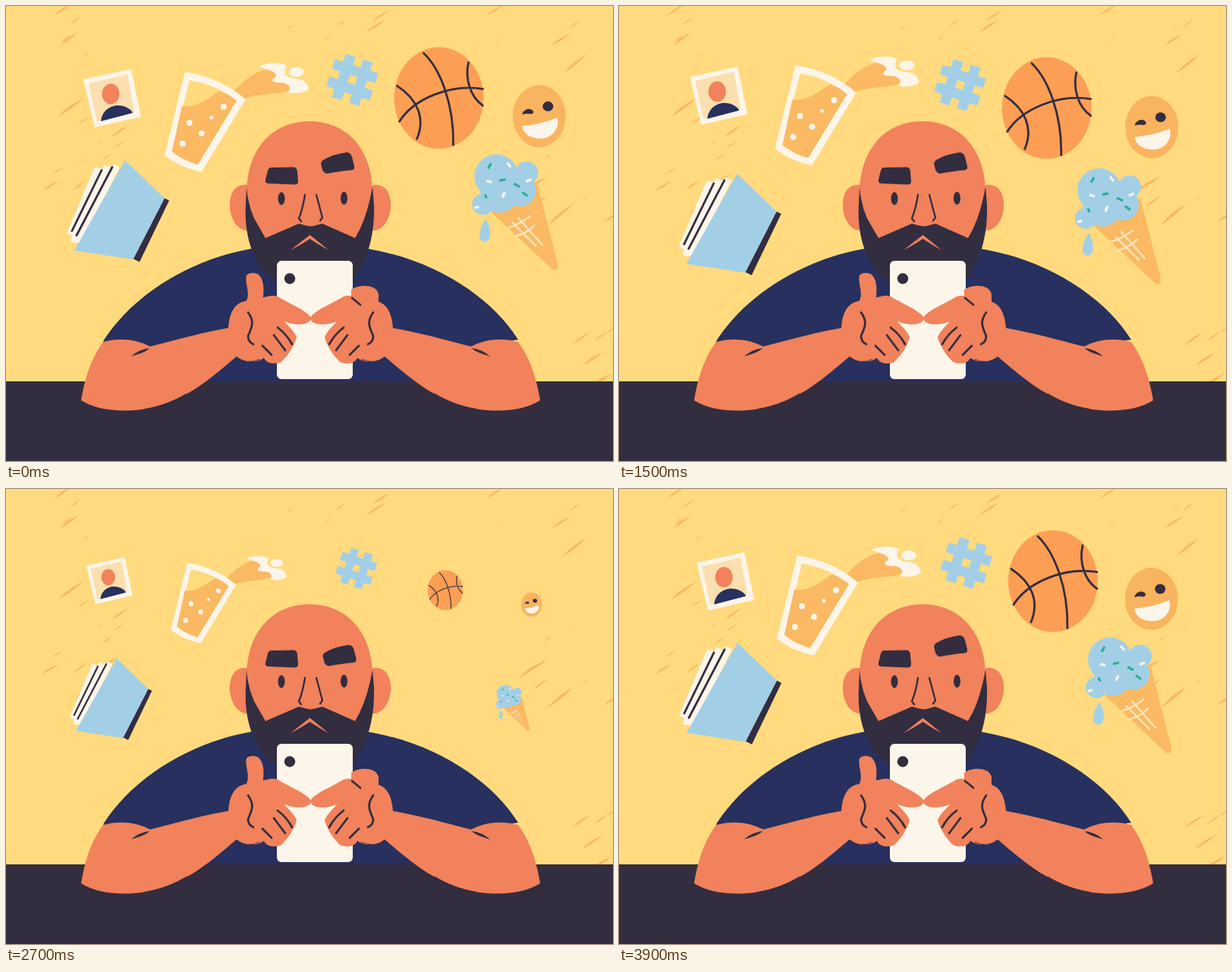
Recreate the animation shown at these times as an HTML page. Size 800x600 px, loop 4 s.

```html
<!DOCTYPE html>
<html lang="en">
<head>
<meta charset="utf-8">
<title>Scrolling</title>
<style>
  html, body { margin: 0; width: 100%; height: 100%; overflow: hidden; background: #ffda7e; }
  svg { position: absolute; inset: 0; width: 100%; height: 100%; display: block; }
  .skin { fill: #f1825b; }
  .dark { fill: #332d40; }
  .navy { fill: #27305e; }
  .white { fill: #fcf5e9; }
  .blue { fill: #a3cfe6; }
  .amber { fill: #fab962; }
  .line { fill: none; stroke: #332d40; stroke-width: 2.8; stroke-linecap: round; stroke-linejoin: round; }
  .fine { stroke-width: 2.3; }
  .thin { stroke-width: 0.9; }
</style>
</head>
<body>
<svg viewBox="0 0 800 600">
  <defs>
    <g id="arm">
      <path class="skin" d="M128 443C148 437 172 439 190 449C225 440 260 430 296 424L320 470L304 462C270 491 237 521 185 531C148 537 118 532 99 520C104 490 112 465 128 443Z"/>
      <path class="line thin" d="M183 531.500C205 528 222 521 238 511"/>
      <path class="dark" d="M165 462Q175 453 189 451Q186 456 165 462Z"/>
    </g>
    <g id="hand">
      <path class="skin" d="M293 426C294 408 299 392 316 389L345 383Q352 381 358 383C372 392 396 401 402 411C402 420 386 423 367 416C374 424 381 430 383 437C380 449 370 463 362 470C352 473 343 471 340 464C330 472 313 470 304 462Z"/>
      <path class="line" d="M319 404C328 416 324 424 319 435Q319 443 326 446M358 424Q370 433 377 446M353 434L368 454M338 448L350 460"/>
      <path class="line thin" d="M303 464Q318 473 334 466"/>
    </g>
    <path id="ear" class="skin" d="M319 236C300 233 294 250 295 266C297 285 307 298 323 296Z"/>
  </defs>

  <rect width="800" height="600" fill="#ffda7e"/>
  <g id="streaks" fill="#f8b75e"></g>

  <g id="photo">
    <path class="white" d="M102 97L165 83L178 146L117 160Z"/>
    <path fill="#fbdfae" d="M109 102L160 90L169 140L120 152Z"/>
    <ellipse class="skin" cx="138" cy="116" rx="11.5" ry="13.5"/>
    <path class="navy" d="M125 152C126 139 136 132 146 131C157 131 165 136 167 141Z"/>
  </g>

  <g id="book">
    <path class="white" d="M118 212L128 214L130 209L138 212L143 208L151 212L100 312L86 311L88 303L81 299Z"/>
    <path class="line" d="M127 216L88 296M141 212L94 302"/>
    <path class="blue" d="M158 203L212 255L171 334L91 322Z"/>
    <path class="dark" d="M210 253L216 256L177 337L169 333Z"/>
  </g>

  <g id="beer">
    <path class="amber" d="M300 114C316 97 335 79 361 84L380 108C366 118 340 113 312 123Z"/>
    <path class="white" d="M335 80C345 74 364 74 371 79C365 90 371 95 385 96C395 97 400 104 400 110C395 115 379 116 373 114C379 106 372 101 362 101C352 101 349 98 357 93C358 86 345 84 335 80Z"/>
    <ellipse class="white" cx="384" cy="87" rx="10" ry="6.5"/>
    <path class="white" d="M237 87Q284 94 317 123L259 219Q230 213 210 197Z"/>
    <path fill="#ffda7e" d="M243 98Q278 103 305 125L254 209Q235 204 220 192Z"/>
    <path class="amber" d="M233 132C252 135 268 122 283 112Q296 117 305 125L254 209Q235 204 220 192Z"/>
    <g class="white">
      <circle cx="288" cy="133" r="4"/><circle cx="272" cy="147" r="2.5"/><circle cx="243" cy="154" r="4"/>
      <circle cx="259" cy="168" r="4"/><circle cx="234" cy="181.5" r="4"/>
    </g>
  </g>

  <g id="hash">
    <path transform="translate(456 97.5) rotate(18)" fill="none" stroke="#a3cfe6" stroke-width="13.5" d="M-12-30V30M12-30V30M-30-12H30M-30 12H30"/>
  </g>

  <g id="ball">
    <ellipse cx="570" cy="120" rx="59" ry="67" fill="#fc9f55"/>
    <path class="line" d="M550 61C572 82 590 128 589 182M518 151C537 121 585 101 628 108M515 104C541 121 553 146 541 174M609 73C604 96 612 119 628 130"/>
  </g>

  <g id="smiley">
    <ellipse cx="702.5" cy="145" rx="35" ry="41" fill="#f9b45f"/>
    <ellipse class="dark" cx="714" cy="132" rx="7" ry="6.5"/>
    <path class="dark" d="M680 143C681 136 691 132 695 139Q694 143 690 142Q685 141 680 143Z"/>
    <path class="white" d="M680 158Q704 156 726 147C730 158 722 174 705 174.500C691 175 681 168 680 158Z"/>
  </g>

  <g id="cone">
    <path class="amber" d="M637 270L698 233L725 340Q725 349 718 346Z"/>
    <path fill="none" stroke="#fde5b8" stroke-width="2.500" stroke-linecap="round" d="M673 278L704 313M665 284L696 315M660 291Q675 286 688 276M670 302Q684 298 694 288"/>
    <g class="blue">
      <circle cx="644" cy="223" r="29"/><circle cx="684" cy="218.500" r="15"/><circle cx="675" cy="242" r="21"/>
      <circle cx="648" cy="246" r="25"/><circle cx="626" cy="260" r="14"/>
      <path d="M630 279C638 292 638 309 628.500 309C619 309 620 294 630 279Z"/>
    </g>
    <g fill="none" stroke-width="3.200">
      <path stroke="#2bae98" d="M633 213L637 206M648 229L656 227M667 233L675 237M678 244L685 249M629 247L631 252"/>
      <path stroke="#fcf5e9" d="M658 205L663 211M631 229L638 231M652 251L655 244M615 265L621 263M683 230L690 227"/>
    </g>
  </g>

  <path class="navy" d="M128 443C161 387 238 333 330 319H470C564 333 640 384 675 440L613 449L540 496H262L190 449Z"/>
  <path class="line thin" d="M129 441Q146 415 175 393"/>
  <use href="#ear"/>
  <use href="#ear" transform="translate(802) scale(-1 1)"/>
  <path class="skin" d="M317 250C316 190 350 152 400 152C450 152 484 190 483 250L480 310H322Z"/>
  <path class="dark" d="M317 239Q319 262 327 280L342 306L386 287Q401 292 417 287L460 306Q476 280 483 238L485 262C486 300 478 335 455 364H357C331 350 313 310 316 262Z"/>
  <path class="skin" d="M394 248L386 281Q389 290 402 290.500Q416 289 417 280L409 248Z"/>
  <path class="line fine" d="M394 249Q391 268 386 280L389 284M409 249Q413 264 417 279L414 283"/>
  <path class="skin" d="M375 322Q390 310 400.500 302Q411 310 425 322Q411 314 400.500 307Q390 314 375 322Z"/>
  <ellipse class="dark" cx="363" cy="254" rx="4.500" ry="8.500"/>
  <ellipse class="dark" cx="445.500" cy="253.500" rx="4.500" ry="8.500"/>
  <path class="dark" d="M350 213L379 212.500Q384 213 384 219L385 231Q385 235.500 380 235.500L345 234Q341 233 342 229L345 217Q346 213 350 213Z"/>
  <path id="brow" class="dark" d="M418 203Q432 195 449 193Q454 193 456 199L459 211Q460 216 455 216.500Q438 218 424 221Q419 221 417 216L415 208Q415 205 418 203Z"/>

  <rect class="dark" y="495" width="800" height="105"/>
  <use href="#arm"/>
  <use href="#arm" transform="translate(803) scale(-1 1)"/>
  <rect class="white" x="357" y="336" width="100" height="156" rx="6"/>
  <circle class="dark" cx="374" cy="359.500" r="7.200"/>
  <path class="skin" d="M315 392C324 380 314 366 317 355Q322 350 331 353C340 358 341 374 338 390L328 404Z"/>
  <path class="skin" d="M455 384V374C465 367 488 366 491 380V396L470 404Z"/>
  <use href="#hand"/>
  <use href="#hand" transform="translate(803) scale(-1 1)"/>
  <path class="line" d="M456 385L467 394"/>
</svg>

<script>
const LOOP = 4000, STEP = 100;
const byId = id => document.getElementById(id);

// Brush streaks scattered around a few spots of the wall
let seed = 7;
const random = () => (seed = seed * 16807 % 2147483647) / 2147483647;
const spots = [[50, 40], [95, 150], [80, 235], [430, 35], [700, 45], [745, 220], [770, 290], [765, 465]];

function streak([cx, cy]) {
  const x = cx + (random() - 0.5) * 130, y = cy + (random() - 0.5) * 80;
  const h = 4 + 18 * random() ** 1.5, w = h * 0.12 + 0.3;
  return `<path transform="translate(${x} ${y}) rotate(${-30 - 10 * random()})"
    d="M${-h} 0Q${-h * 0.2} ${-w * 1.6} ${h} 0Q${h * 0.1} ${w} ${-h} 0Z"/>`;
}
byId('streaks').innerHTML = spots.flatMap(spot => Array.from({ length: 6 }, () => streak(spot))).join('');

// Each item sways once per loop on an ellipse: pivot in the drawing, centre, cosine and sine parts.
// The items on the right leave and return later.
const item = (id, lag, pivot, centre, cos, sin) => ({ el: byId(id), lag, pivot, centre, cos, sin });
const items = [
  item('photo', 0, [140, 121.5], [136, 120.2], [4, 1.3], [-2.5, -1.3]),
  item('book', 0, [148.5, 270.5], [144.5, 279], [3, -8], [5.5, 5.5]),
  item('beer', 0, [305, 147.5], [299.8, 144], [4, 3.5], [5, -4]),
  item('hash', 0, [456, 97.5], [455.5, 101.8], [1, -4.5], [-7.5, -1]),
  item('ball', 200, [570, 120], [570.5, 129.3], [0, -8], [-9.5, -0.5]),
  item('smiley', 200, [702.5, 145], [699.8, 152.3], [3, -7], [6.5, 3.5]),
  item('cone', 200, [668.5, 270.5], [665.3, 283], [5.5, -11], [-5.5, -0.5])
];

function ease(t, from, to) {
  const p = Math.min(1, Math.max(0, (t - from) / (to - from)));
  return p * p * (3 - 2 * p);
}

// Shrinks and grows back, cut off while very small
function sizeAt(t) {
  const s = 1 - ease(t, 1500, 2200) + ease(t, 2200, 2900);
  return s < 0.3 ? 0 : s;
}

function draw(t) {
  const angle = t / LOOP * 2 * Math.PI;
  for (const { el, lag, pivot, centre, cos, sin } of items) {
    const [x, y] = centre.map((c, i) => c + cos[i] * Math.cos(angle) + sin[i] * Math.sin(angle));
    const s = sizeAt(t - lag);
    el.style.display = s ? '' : 'none';
    el.setAttribute('transform', `translate(${x} ${y}) scale(${s}) translate(${-pivot[0]} ${-pivot[1]})`);
  }
  const frown = ease(t, 1500, 1900) - ease(t, 2800, 3300);
  brow.setAttribute('transform', `translate(${2.5 * frown} ${12.5 * frown})`);
}

const brow = byId('brow');
const start = performance.now();
let shown = -1;
function tick() {
  const t = Math.floor((performance.now() - start) % LOOP / STEP) * STEP;
  if (t !== shown) draw(shown = t);
  requestAnimationFrame(tick);
}
tick();
</script>
</body>
</html>
```
